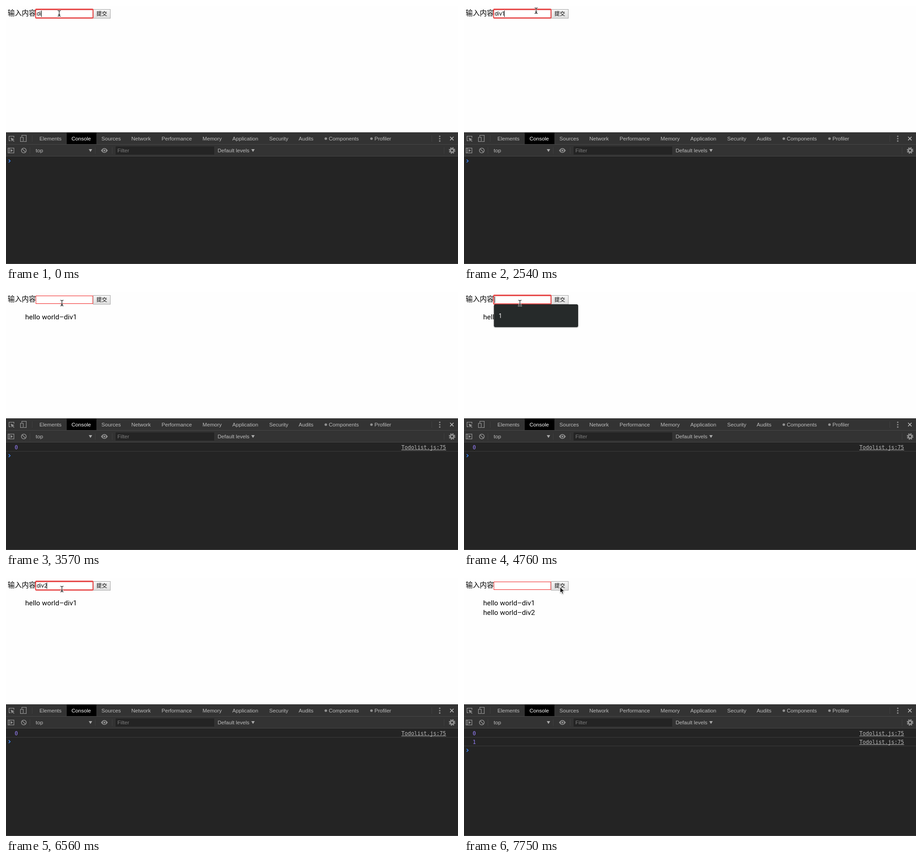
Animation of 990 by 566 pixels, one loop 8 s. Source, as an HTML page:

```html
<!DOCTYPE html>
<html lang="zh">
<head>
<meta charset="utf-8">
<title>Todo list with console</title>
<style>
html, body { margin: 0; width: 100%; height: 100%; overflow: hidden; background: #fff; }
svg { display: block; }
text { white-space: pre; }
.cjk { font-family: "Noto Sans CJK SC", "Noto Sans CJK", sans-serif; }
.item { font: 15.4px Roboto, sans-serif; }
.field { font: 11.5px Inter, sans-serif; }
.ui { font: 11.6px "Liberation Sans", Arial, sans-serif; fill: #bdbdbd; }
.mono { font: 11.6px "DejaVu Sans Mono", monospace; }
.line { fill: none; stroke: #919191; stroke-width: 1.3; }
.solid { fill: #919191; }
</style>
</head>
<body>
<svg width="990" height="566" viewBox="0 0 990 566">
  <defs>
    <linearGradient id="up" x2="0" y2="1"><stop stop-color="#f6f6f6"/><stop offset="1" stop-color="#dedede"/></linearGradient>
    <linearGradient id="down" x2="0" y2="1"><stop stop-color="#a6a6a6"/><stop offset="1" stop-color="#b9b9b9"/></linearGradient>
    <filter id="soft" x="-20%" y="-50%" width="140%" height="200%"><feGaussianBlur stdDeviation="0.7"/></filter>
    <filter id="shade" x="-20%" y="-30%" width="140%" height="170%"><feDropShadow dx="0" dy="1" stdDeviation="1.2" flood-opacity=".4"/></filter>
  </defs>

  <rect width="990" height="278" fill="#fefefe"/>
  <text class="cjk" x="3.8" y="21.3" font-size="15.4">输入内容</text>
  <rect id="button" x="191" y="7.5" width="37.5" height="19.5" stroke="#a6a6a6"/>
  <text class="cjk" x="198" y="21.4" font-size="11.8">提交</text>
  <rect id="halo" x="65" y="7" width="125.5" height="19.5" rx="1.5" fill="none" stroke="#e85050" stroke-width="2.4" filter="url(#soft)"/>
  <rect x="65.5" y="8.5" width="124.5" height="17" fill="#fff"/>
  <rect id="frame" x="65.5" y="8.5" width="124.5" height="17" fill="none"/>
  <text id="value" class="field" x="67.2" y="21"></text>
  <rect id="caret" y="10" width="1" height="14"/>
  <g id="items"></g>
  <g id="menu">
    <rect x="65.5" y="27" width="184.5" height="50" rx="3.5" fill="#28292b" filter="url(#shade)"/>
    <text x="76.5" y="57" font-family="Inter, sans-serif" font-size="12.5" fill="#fff">1</text>
  </g>

  <rect y="277" width="990" height="289" fill="#242424"/>
  <rect y="277" width="990" height="53" fill="#333"/>
  <path d="M0 277.5H990M0 303.5H990M0 329.5H990M0 565.5H990" stroke="#484848"/>
  <path d="M57.5 284V298M932.5 284V298M52.5 310V324M195.5 310V324M232.5 310V324M959.5 310V324" stroke="#404040"/>
  <rect x="133" y="278" width="65" height="25" fill="#000"/>
  <rect x="240" y="308" width="216" height="18" fill="#242424"/>
  <g id="labels"></g>
  <circle cx="700.5" cy="291" r="2.8" class="solid"/>
  <circle cx="800.5" cy="291" r="2.8" class="solid"/>

  <g class="line">
    <path d="M10 295.5H6.6V285.6H17.4V289"/>
    <path d="M34.6 287V283.6H44.4V297.4H39M31.6 288.2H37.8V297.4H31.6Z"/>
    <path d="M4.6 311.6H17.4V322.4H4.6ZM7.5 311.6V322.4"/>
    <circle cx="39" cy="317" r="5.3" stroke-width="1.6"/>
    <path d="M35.3 313.3L42.7 320.7" stroke-width="1.6"/>
    <path d="M972.7 287L980.3 294.6M980.3 287L972.7 294.6" stroke="#bbb" stroke-width="1.5"/>
    <circle cx="977" cy="317" r="3.7" stroke-width="3"/>
    <circle cx="977" cy="317" r="6" stroke-width="2.4" stroke-dasharray="2.6 2.112"/>
  </g>
  <g class="solid">
    <path d="M10.2 288.8L18.6 292.2L15.2 293.4L18.4 296.6L17.2 297.8L14 294.6L12.7 297.6Z"/>
    <path d="M10.2 313.8L15.2 317L10.2 320.2Z"/>
    <path d="M208 317Q215.5 306.6 223 317Q215.5 327.4 208 317Z"/>
    <circle cx="215.5" cy="317" r="3.5" fill="#333"/>
    <circle cx="215.5" cy="317" r="2.1"/>
    <path d="M181.3 314H188.7L185 320.3ZM537.3 314H544.7L541 320.3Z" fill="#aaa"/>
    <circle cx="950" cy="285.8" r="1.6"/><circle cx="950" cy="291" r="1.6"/><circle cx="950" cy="296.2" r="1.6"/>
  </g>
  <g id="logs"></g>
  <path id="prompt" d="M5.8 336.8L9.2 340L5.8 343.2" fill="none" stroke="#3b82f0" stroke-width="1.6"/>

  <g id="beam" fill="none" stroke-linecap="round">
    <path d="M-3 -6Q0 -6 0 -4V4Q0 6.5 -3 6.5M3 -6Q0 -6 0 -4M0 4Q0 6.5 3 6.5M-2 3H2" stroke="#fff" stroke-width="2.6" opacity=".85"/>
    <path d="M-3 -6Q0 -6 0 -4V4Q0 6.5 -3 6.5M3 -6Q0 -6 0 -4M0 4Q0 6.5 3 6.5M-2 3H2" stroke="#000" stroke-width="1.1"/>
  </g>
  <path id="arrow" d="M0 0V12.6L2.9 9.9L5 15L7.2 14.1L5.1 9.2H9.2Z" stroke="#fff" stroke-width="1" filter="url(#shade)"/>
</svg>
<script>
const LOOP = 8000;
const $ = id => document.getElementById(id);
const label = (x, y, s, cls, fill) =>
  `<text x="${x}" y="${y}" class="${cls}"${fill ? ` style="fill:${fill}"` : ""}>${s}</text>`;

const tabs = [["Elements", 73.3], ["Console", 143.5], ["Sources", 209], ["Network", 274.5],
  ["Performance", 340.8], ["Memory", 430.6], ["Application", 495.8], ["Security", 576.5],
  ["Audits", 641], ["Components", 707], ["Profiler", 807]];
$("labels").innerHTML =
  tabs.map(([s, x]) => label(x, 295, s, "ui", s === "Console" ? "#fff" : "")).join("") +
  label(65, 321, "top", "ui") +
  label(244, 321.3, "Filter", "ui", "#7d7d7d") +
  label(463.5, 321, "Default levels", "ui");

for (let i = 0; i < 2; i++) {
  const y = 345 + 19 * i;
  $("items").innerHTML += label(42, 60 + 21 * i, `hello world–div${i + 1}`, "item");
  $("logs").innerHTML += "<g>" + label(19, y, i, "mono", "#9980ff") +
    label(866, y, "Todolist.js:75", "mono", "#b8b8b8") +
    `<path d="M866 ${y + 1.5}H964" stroke="#b8b8b8"/>` +
    `<path d="M0 ${y + 4.5}H990" stroke="#3c3c3c"/></g>`;
}

const caretX = { "": 67, d: 74, di: 77, div: 83, div1: 88, div2: 89 };
const beam = (x, y) => ({ x, y, arrow: false });
const arrow = (x, y) => ({ x, y, arrow: true });

// Each step changes only the listed properties.
const steps = [
  [0, { text: "di", caret: true, focus: true, menu: false, pressed: false, count: 0, ...beam(116.5, 16) }],
  [300, { caret: false }],
  [590, { text: "div", caret: true }],
  [1040, { caret: false }],
  [1490, { text: "div1", caret: true }],
  [1940, { caret: false }],
  [2390, { caret: true, ...beam(128, 14) }],
  [2540, beam(158, 10)],
  [2690, arrow(193, 11)],
  [2820, arrow(196, 13)],
  [2970, { focus: false, pressed: true }],
  [3120, { text: "", pressed: false, count: 1 }],
  [3420, beam(146, 20)],
  [3570, beam(122.5, 24)],
  [3720, { focus: true, caret: true, menu: true }],
  [4160, { caret: false }],
  [4760, { caret: true }],
  [5060, { text: "d", menu: false }],
  [5210, { text: "di" }],
  [5660, { text: "div" }],
  [6110, { caret: false }],
  [6560, { text: "div2", caret: true }],
  [6860, beam(129, 24)],
  [7010, { caret: false, ...beam(154, 23) }],
  [7160, beam(182, 21)],
  [7300, arrow(204, 20)],
  [7450, arrow(210.5, 20)],
  [7600, { focus: false, pressed: true }],
  [7750, { text: "", pressed: false, count: 2 }]
];

const show = (el, on) => el.setAttribute("visibility", on ? "visible" : "hidden");

function draw(time) {
  const s = Object.assign({}, ...steps.filter(([t]) => t <= time).map(([, change]) => change));
  $("value").textContent = s.text;
  $("caret").setAttribute("x", caretX[s.text]);
  show($("caret"), s.focus && s.caret);
  show($("halo"), s.focus);
  $("frame").setAttribute("stroke", s.focus ? "#e23c3c" : "#f01818");
  show($("menu"), s.menu);
  $("button").setAttribute("fill", s.pressed ? "url(#down)" : "url(#up)");
  for (const id of ["items", "logs"])
    [...$(id).children].forEach((el, i) => show(el, i < s.count));
  $("prompt").setAttribute("transform", `translate(0 ${19 * s.count})`);
  for (const id of ["beam", "arrow"]) {
    $(id).setAttribute("transform", `translate(${s.x} ${s.y})`);
    show($(id), s.arrow === (id === "arrow"));
  }
}

const start = performance.now();
function tick() {
  draw((performance.now() - start) % LOOP);
  requestAnimationFrame(tick);
}
tick();
</script>
</body>
</html>
```
